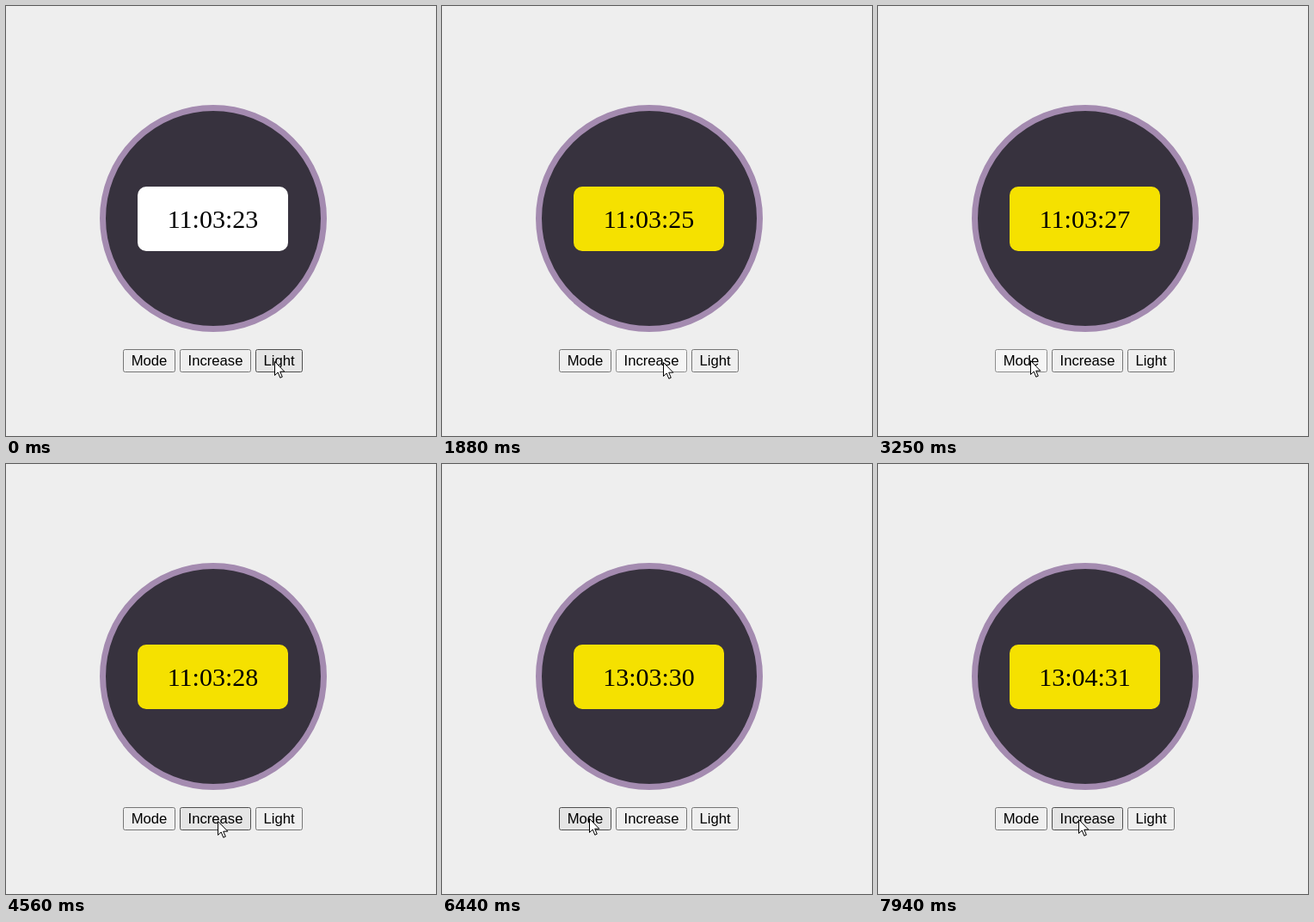
Recreate the animation shown at these times as an HTML page. Size 500 px wide and 500 px high, loop 8 s.

```html
<!DOCTYPE html>
<html lang="en">
<head>
<meta charset="utf-8">
<title>Digital watch</title>
<style>
  html, body { margin: 0; width: 100%; height: 100%; overflow: hidden; background: #eee; }
  .dial, .display, .button, .cursor { position: absolute; box-sizing: border-box; }
  .dial {
    left: 109px; top: 115px; width: 264px; height: 264px;
    border: 7px solid #a48bb0; border-radius: 50%; background: #37323e;
  }
  .display {
    left: 153px; top: 210px; width: 175px; height: 75px; border-radius: 10px;
    font: 30px/75px "Liberation Serif", serif; text-align: center; color: #000;
  }
  .button {
    top: 399px; height: 27px; border: 1px solid #767676; border-radius: 2.5px;
    background: #efefef; color: #000; white-space: nowrap;
    display: flex; justify-content: center;
    font: 16.667px/25px "Liberation Sans", sans-serif;
  }
  .button.hover { background: #e5e5e5; border-color: #4f4f4f; }
  .button.pressed { background: #f5f5f5; border-color: #8d8d8d; }
  .cursor { left: 0; top: 0; width: 14px; height: 22px; }
</style>
</head>
<body>
<div class="dial"></div>
<div class="display"></div>
<div class="button" style="left:136px; width:61px">Mode</div>
<div class="button" style="left:202px; width:83px">Increase</div>
<div class="button" style="left:290px; width:55px">Light</div>
<svg class="cursor" viewBox="0 0 14 22">
  <path d="M.5 .5V16.5L4.2 13L6.8 19.3L9.3 18.2L6.7 12.2H11.8Z" fill="#fff" stroke="#000"/>
</svg>
<script>
const LOOP = 8000, FIRST_TICK = 150, PRESS_TIME = 100;
const display = document.querySelector('.display');
const cursor = document.querySelector('.cursor');
const buttons = [...document.querySelectorAll('.button')].map(el => ({
  el, name: el.textContent, left: el.offsetLeft, right: el.offsetLeft + el.offsetWidth
}));

// Cursor stops: time, x, y
const stops = [
  [0, 312, 413], [240, 312, 413], [520, 335, 418], [620, 335, 418],
  [800, 332, 421], [1000, 331, 422], [1500, 257, 414], [2560, 257, 414],
  [3080, 177, 412], [4130, 177, 412], [4520, 246, 415], [5780, 246, 415],
  [6300, 171, 412], [6860, 171, 412], [7430, 233, 413], [LOOP, 233, 413]
];

const presses = [
  ['Light', 130], ['Increase', 1830], ['Mode', 3200], ['Increase', 4950],
  ['Increase', 5330], ['Mode', 6620], ['Increase', 7600]
];

function cursorAt(t) {
  const i = stops.findIndex(stop => stop[0] > t);
  const [t0, x0, y0] = stops[i - 1], [t1, x1, y1] = stops[i];
  const p = (t - t0) / (t1 - t0), eased = p * p * (3 - 2 * p);
  return [x0 + (x1 - x0) * eased, y0 + (y1 - y0) * eased].map(Math.round);
}

function watchAt(t) {
  let mode = 0, hours = 11, minutes = 3, lit = false;
  for (const [name, start] of presses) {
    if (t < start + PRESS_TIME) break;
    if (name === 'Light') lit = true;
    else if (name === 'Mode') mode++;
    else if (mode === 1) hours++;
    else if (mode === 2) minutes++;
  }
  const seconds = 24 + Math.floor((t - FIRST_TICK) / 1000);
  const time = [hours, minutes, seconds].map(n => String(n).padStart(2, '0')).join(':');
  return { time, lit };
}

function render(t) {
  const { time, lit } = watchAt(t);
  display.textContent = time;
  display.style.background = lit ? '#f5e100' : '#fff';

  const [x, y] = cursorAt(t);
  cursor.style.transform = `translate(${x}px, ${y}px)`;
  const press = presses.find(([, start]) => t >= start && t < start + PRESS_TIME);
  for (const { el, name, left, right } of buttons) {
    el.classList.toggle('hover', x >= left && x < right);
    el.classList.toggle('pressed', !!press && press[0] === name);
  }
}

const began = performance.now();
function frame() {
  render((performance.now() - began) % LOOP);
  requestAnimationFrame(frame);
}
frame();
</script>
</body>
</html>
```
